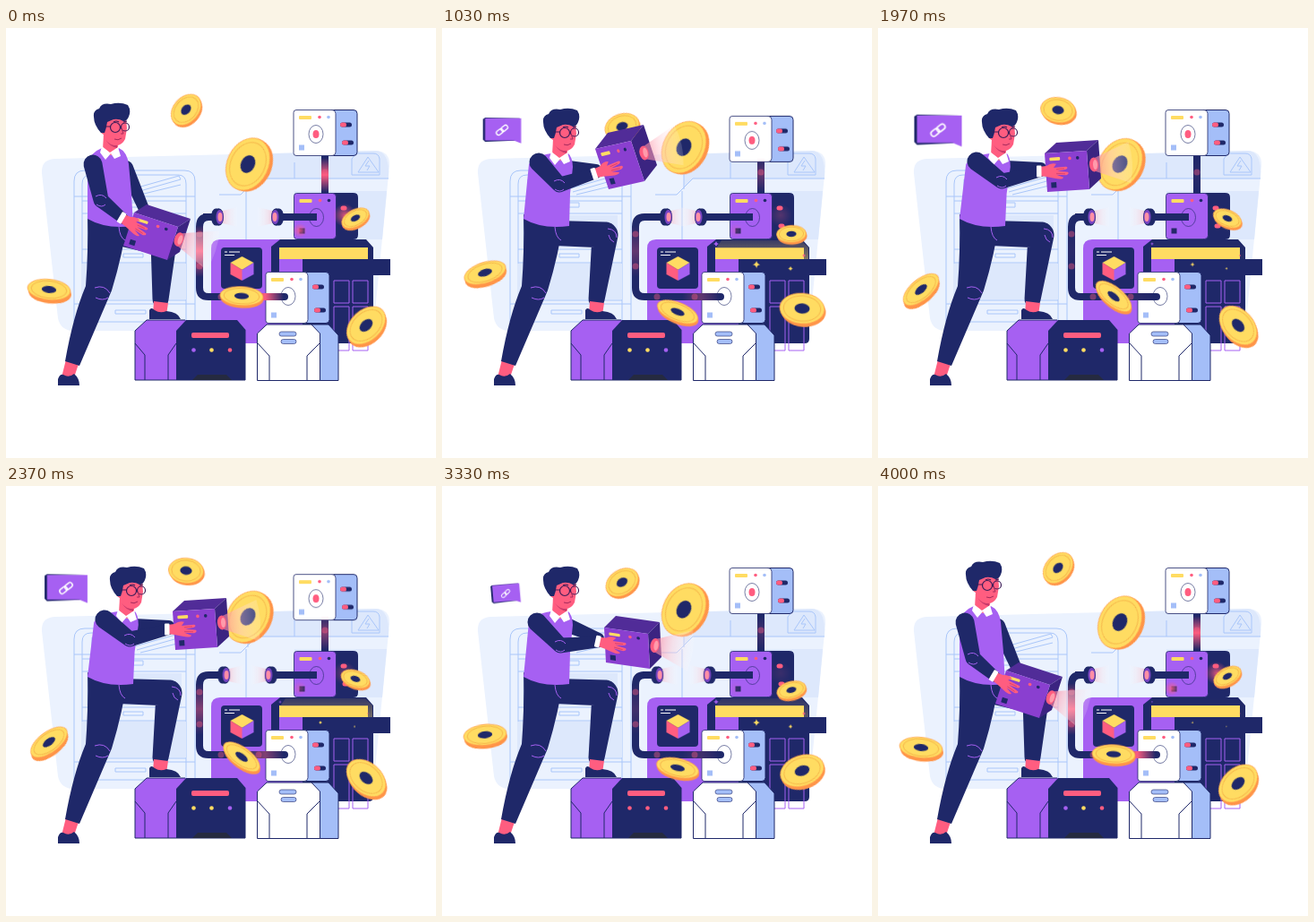
Write an HTML page that moves like this. It is 480 px wide and 480 px high and loops after 4030 ms.

```html
<!DOCTYPE html>
<html lang="en">
<head>
<meta charset="utf-8">
<title>Block factory</title>
<style>
html, body { margin: 0; width: 100%; height: 100%; overflow: hidden; background: #fff; }
svg { display: block; width: 100vw; height: 100vh; }
:root { --sine: cubic-bezier(.37, 0, .63, 1); }
.navy { fill: #1f2869; } .purple { fill: #a660f2; } .pink { fill: #ff5d80; }
.yellow { fill: #ffdc62; } .blue { fill: #a4bef8; } .white { fill: #fff; } .pale { fill: #dde8fc; }
.line { fill: none; stroke: #1f2869; stroke-width: 1; }
.faint { fill: none; stroke: #a9c6fa; stroke-width: 1; }
.seam { fill: none; stroke: #a660f2; stroke-width: 1; }
.pipe { fill: none; stroke: #1f2869; stroke-width: 8; }

.press { animation: press 2015ms ease-in-out infinite; }
@keyframes press { 0%, 4%, 64.5%, 100% { transform: none; } 31%, 37.5% { transform: translateY(14px); } }

.plug { animation: plug 2015ms ease-in-out infinite; }
@keyframes plug { 0%, 4%, 74%, 100% { transform: none; } 31%, 51% { transform: translateX(var(--dx)); } }

.shine { animation: shine 2015ms ease-in-out infinite; }
@keyframes shine { 0%, 8%, 100% { opacity: 0; } 31%, 38% { opacity: 1; } 51% { opacity: .45; } 65%, 92% { opacity: .25; } }

.spark { animation: spark 2015ms ease-in-out infinite; }
@keyframes spark { 0%, 10%, 100% { transform: scale(0); } 31%, 38% { transform: none; } 51% { transform: scale(.6); } 97% { transform: scale(.4); } }

.energy { animation: energy 4030ms ease-in-out infinite; }
@keyframes energy { 0%, 100% { opacity: 1; } 15% { opacity: .25; } 26% { opacity: .3; } 49% { opacity: .05; } 68% { opacity: .8; } 83% { opacity: .15; } }

.bob { animation: bob 1007.5ms var(--sine) infinite alternate; }
@keyframes bob { to { transform: translateY(var(--dy)); } }
.tilt { animation: tilt 2015ms var(--sine) infinite alternate; }
@keyframes tilt { from { transform: rotate(var(--from)); } to { transform: rotate(var(--to)); } }

.card { animation: card 4030ms ease-in-out infinite; }
@keyframes card {
  0%, 5%, 95%, 100% { transform: translate(6px, 6px) rotate(-14deg) scale(0); }
  15.6% { transform: translate(-2px, 4px) rotate(-5deg) scale(.84); }
  25.6%, 68.7% { transform: scale(.82); }
  49% { transform: scale(1.02); }
  82.6% { transform: translate(4px, 6px) rotate(-5deg) scale(.62); }
}
.cube { animation: cube 4030ms ease-in-out infinite; }
@keyframes cube { 0%, 7%, 24%, 100% { transform: none; } 15.6% { transform: rotate(17deg); } }

.lamp { animation: 4030ms step-end infinite; }
.first { animation-name: first; }
.second { animation-name: second; }
.third { animation-name: third; }
@keyframes first { 0%, 93% { fill: #a660f2; } 12% { fill: #ffdc62; } 78% { fill: #ff5d80; } }
@keyframes second { 0%, 90% { fill: #ffdc62; } 62% { fill: #ff5d80; } }
@keyframes third { 0%, 78% { fill: #ff5d80; } 20% { fill: #a660f2; } }
</style>
</head>
<body>
<svg id="stage" viewBox="0 0 480 480">
  <defs>
    <linearGradient id="beamFill"><stop stop-color="#ff7d95" stop-opacity=".65"/><stop offset=".45" stop-color="#ffc9d2" stop-opacity=".45"/><stop offset="1" stop-color="#fff" stop-opacity=".15"/></linearGradient>
    <linearGradient id="pulseV" x2="0" y2="1"><stop stop-color="#ff5d80" stop-opacity="0"/><stop offset=".5" stop-color="#ff5d80"/><stop offset="1" stop-color="#ff5d80" stop-opacity="0"/></linearGradient>
    <linearGradient id="pulseH"><stop stop-color="#ff5d80" stop-opacity="0"/><stop offset=".5" stop-color="#ff5d80"/><stop offset="1" stop-color="#ff5d80" stop-opacity="0"/></linearGradient>
    <linearGradient id="shineFill" x2="0" y2="1"><stop stop-color="#5c5560"/><stop offset="1" stop-color="#ffdc62"/></linearGradient>
    <radialGradient id="glow"><stop stop-color="#ff5d80" stop-opacity=".8"/><stop offset="1" stop-color="#ff5d80" stop-opacity="0"/></radialGradient>
  </defs>

  <!-- room -->
  <path fill="#ebf2fe" d="M54 146L412 137Q429 137 428 154L411 326Q410 338 398 338H76Q61 338 58 324L40 162Q39 147 54 146Z"/>
  <path class="pale" d="M270 141L412 137Q429 137 427 168H280L270 178ZM322 182H425L420 236H322Z"/>
  <path class="faint" d="M270 141V180M238 186H262L280 168H427M268 182V236M322 168V150"/>
  <path class="faint" d="M391 140H410Q416 140 417 146V164H386V146Z"/>
  <path class="faint" d="M404 144L416 161H393ZM405 148L401 154H406L403 159"/>

  <!-- cupboard -->
  <path class="faint" d="M76 328V171Q76 159 88 159H199Q211 159 211 171V328ZM85 328V174Q85 164 95 164H192Q201 164 201 174V328M76 188H211M85 193H201M85 207H201M85 247H201M85 262H201M85 304H201M76 308H211"/>
  <path class="pale" d="M84 263H201V303H84ZM90 209H196V245H90Z"/>
  <path class="faint" d="M131 195H153V200H131ZM131 252H153V256H131ZM122 315H156V319H122ZM96 188V169H102V188M102 172H108V188M112 188L119 169L124 171L117 188M140 180L193 165L195 169L146 183M150 186L195 175"/>

  <!-- display -->
  <path class="purple" d="M229 352V246Q229 236 239 236H331V352Z"/>
  <rect class="navy" x="240" y="245" width="46" height="46" rx="4"/>
  <path stroke="#fff" d="M244 250H247M249 250H261M244 253.500H255"/>
  <g transform="translate(263.500 268)"><g class="cube">
    <path class="yellow" d="M0-13L13-6L0 2L-13-6Z"/><path class="pink" d="M-13-6L0 2V14L-13 7Z"/><path class="purple" d="M13-6L0 2V14L13 7Z"/>
  </g></g>

  <!-- shelf -->
  <path class="navy" d="M296 272V244L306 236H402L410 245V258H429V276H410V347Q410 352 405 352H331V258H305V272Z"/>
  <rect class="yellow" x="305" y="245" width="99" height="13"/>
  <path class="shine" fill="url(#shineFill)" d="M312 237H401L409 245V258H404V246H306Z"/>
  <path class="seam" d="M366 282H383V307H366ZM387 282H404V307H387ZM366 352V311H383V360H370M387 360V311H404V360H387"/>

  <!-- pipes -->
  <path class="pipe" d="M356 138V186"/>
  <g id="crates"></g>
  <path class="pipe" d="M238 211H226Q216 211 216 222V290Q216 300 226 300H311"/>
  <circle class="navy" cx="311" cy="300" r="4"/>
  <path class="pipe" d="M302 211H347"/>
  <g class="pink" opacity=".4"><circle cx="356" cy="161" r="3.500"/><circle cx="216" cy="230" r="3.500"/><circle cx="216" cy="266" r="3.500"/><circle cx="240" cy="300" r="3.500"/><circle cx="282" cy="300" r="3.500"/></g>
  <g class="energy">
    <rect x="352" y="145" width="8" height="38" fill="url(#pulseV)"/>
    <rect x="212" y="220" width="8" height="58" fill="url(#pulseV)"/>
    <rect x="268" y="296" width="42" height="8" fill="url(#pulseH)"/>
    <circle cx="378" cy="209" r="13" fill="url(#glow)"/>
    <circle cx="328" cy="226" r="8" fill="url(#glow)"/>
  </g>
  <g id="plugs"></g>

  <!-- pedestals -->
  <path class="purple" d="M144 393V338L157 326H205V393Z"/>
  <path class="line" d="M144 393V338L157 326H200M144 352L155 365V393M190 352L181 365V393M144 393H267"/>
  <path class="navy" d="M190 393V338L201 326H258L267.500 337V393Z"/>
  <rect class="pink" x="207" y="340" width="42" height="6" rx="2"/>
  <circle class="lamp first" cx="209.500" cy="359.500" r="2.300"/><circle class="lamp second" cx="229.500" cy="359.500" r="2.300"/><circle class="lamp third" cx="250" cy="359.500" r="2.300"/>
  <path fill="#252a40" d="M208 393L214 387H246L252 393Z"/>
  <path class="blue" stroke="#1f2869" d="M338 331H360L371 343V393.500H340Z"/>
  <path class="white" stroke="#1f2869" d="M280.500 393.500V341L291 331H341L350.500 341V393.500Z"/>
  <path class="line" d="M281 352L294 366V393M350 352L336 366V393"/>
  <g class="blue" stroke="#1f2869" stroke-width=".6"><rect x="305" y="339" width="19" height="5" rx="2.500"/><rect x="307" y="347.500" width="17" height="5" rx="2.500"/></g>

  <g id="sparks"></g>
  <g id="coins"></g>

  <g transform="translate(67 114)"><g class="card">
    <path class="navy" d="M-26-15L-23-17L24-16V14L-23 16L-26 13Z"/>
    <path class="purple" d="M-23-16H26V18L16 14H-23Z"/>
    <g transform="rotate(-38)" fill="none" stroke="#fff" stroke-width="1.600"><rect x="-9" y="-3" width="10" height="6" rx="3"/><rect x="-1" y="-3" width="10" height="6" rx="3"/></g>
  </g></g>

  <!-- worker -->
  <path id="backArm" class="navy"/>
  <path id="frontLeg" class="navy"/>
  <path id="knee" class="seam"/>
  <path class="pink" d="M67 370L81 375L76 390H62ZM165 305L181 307L179 320H164Z"/>
  <path class="navy" d="M58 399V392Q60 386 64 387Q70 391 76 386Q82 391 82 399ZM160 325V315Q162 311 166 315Q172 319 179 316Q192 317 195 325Z"/>
  <path class="navy" d="M91 208L135 216Q131 250 118 293L82 377L66 372Q75 321 89 288Q92 250 91 208Z"/>
  <path class="seam" d="M99 290Q110 286 116 296M100 301Q108 305 114 301M126 222Q127 234 133 237"/>
  <path id="torso" class="purple"/>
  <g id="head">
    <path class="pink" d="M109 118L125 122V137L117 142L108 136Z"/>
    <path class="white" d="M107 132L116 139L125 133L128 143L121 146L117 140L111 147L105 139Z"/>
    <path fill="#c93a6b" d="M111 124Q117 131 124 131V134Q115 132 111 124Z"/>
    <path class="pink" d="M107 103Q118 95 134 101L135 112L133 124Q129 132 121 131Q111 129 109 119Q104 117 106 111Z"/>
    <path class="navy" d="M106 117Q98 108 98 99Q97 92 104 90Q107 83 117 85Q127 82 136 86Q140 92 137 99Q135 104 131 104Q126 101 120 102L113 105Q112 112 110 117Z"/>
    <g fill="none" stroke="#3b1d58" stroke-width="1.200"><circle cx="122" cy="111" r="5.500"/><circle cx="133" cy="110.500" r="4.500"/><path d="M117 110L109 110M120 105Q123 103 126 105M131 105L135 104"/></g>
    <path d="M121 124Q125 126 129 123M129 112L131 118L128 118" fill="none" stroke="#a52a5c"/>
  </g>
  <path id="boxTop" fill="#512c98"/>
  <path id="boxSide" fill="#3b2481"/>
  <g id="boxFront">
    <rect width="48" height="42" fill="#8a3fd0"/>
    <rect class="yellow" x="5" y="5" width="12" height="3.500" rx="1"/>
    <circle class="pink" cx="28" cy="7" r="1.800"/><circle class="navy" cx="37" cy="7" r="1.800"/>
    <rect class="navy" x="5" y="32" width="6" height="6"/>
  </g>
  <g id="beam">
    <path fill="url(#beamFill)" d="M0-7L40-23Q46 0 40 23L0 7Z"/>
    <ellipse class="pink" rx="5" ry="8"/><ellipse fill="#ff9bab" cx="1.500" rx="2.500" ry="5.500"/>
  </g>
  <path id="arm" class="navy"/>
  <path id="elbow" class="seam"/>
  <g id="hand">
    <path class="pink" d="M-2-5L6-6Q12-10 17-8L14-4L28-5Q31-4 28-2L18 0L30 1Q32 3 28 4.500L17 4L25 7Q24 10 15 8L6 6L-2 5Z"/>
    <path d="M17-2L26-3M17 2.500L27 3" stroke="#c93a6b" stroke-width=".7"/>
    <rect class="white" x="-5" y="-6.500" width="5.500" height="13" rx="1"/>
  </g>
</svg>
<script>
const $ = id => document.getElementById(id);

const pill = (x, y) => `<rect class="navy" x="${x}" y="${y}" width="13" height="5" rx="2.500"/>
  <rect class="pink" x="${x}" y="${y}" width="7" height="5" rx="2.500"/>`;

function crate(x, y, h, front, side, core) {
  return `<g transform="translate(${x} ${y})">
    <rect class="${side}" x="40" width="31" height="${h}" rx="4" stroke="#1f2869"/>
    <path class="${front}" stroke="#1f2869" stroke-width=".8" d="M3 0H43Q47 0 47 4V${h - 4}Q47 ${h} 43 ${h}H3Q0 ${h} 0 ${h - 3}V3Q0 0 3 0Z"/>
    <rect class="yellow" x="6" y="6.500" width="14" height="4" rx="1"/>
    <circle class="pink" cx="29" cy="8" r="1.800"/>
    <circle class="${side}" cx="39" cy="8" r="1.800"/>
    <ellipse class="line" stroke-opacity=".6" cx="25" cy="27" rx="8" ry="10"/>
    ${core ? '<ellipse class="pink" cx="25" cy="27" rx="3.500" ry="4.500"/>' : ''}
    <rect class="${side}" x="6" y="${h - 12}" width="6" height="6"/>
    ${pill(52, 14)}${pill(54, h - 17)}</g>`;
}
$('crates').innerHTML =
  `<g class="press">${crate(321, 91.500, 51, 'white', 'blue', true)}</g>` +
  crate(321.500, 184.500, 51, 'purple', 'navy') +
  crate(290, 272.500, 57, 'white', 'blue');

const plug = (x, dir) => `<g transform="translate(${x} 211)"><g class="plug" style="--dx:${14 * dir}px">
  <g transform="scale(${dir} 1)">
    <path class="pipe" d="M-16 0H0"/>
    <path fill="url(#beamFill)" opacity=".7" d="M2-6L22-11V11L2 6Z"/>
    <path class="navy" d="M-2-9.500H2V9.500H-2A5 9.500 0 0 1-2-9.500Z"/>
    <ellipse class="navy" cx="2" rx="5" ry="9.500"/><ellipse fill="#7a45c4" cx="2.500" rx="4" ry="8"/>
    <ellipse fill="#ff8fa5" cx="3" rx="2.500" ry="5"/>
  </g></g></g>`;
$('plugs').innerHTML = plug(236, 1) + plug(303, -1);

$('sparks').innerHTML = [[351, 264, 7, 'yellow'], [389, 268.500, 4, 'yellow'], [306, 241, 5, 'purple'], [404, 254, 3, 'pink']]
  .map(([x, y, r, c]) => `<g transform="translate(${x} ${y})"><path class="spark ${c}"
    d="M0 ${-r}Q1-1 ${r} 0Q1 1 0 ${r}Q-1 1 ${-r} 0Q-1-1 0 ${-r}Z"/></g>`).join('');

// x, y, rx, ry, rim x, rim y, first tilt, last tilt, bob
const coins = [
  [201, 91, 19.500, 14, 1.500, 2.500, -48, 9, 19],
  [270, 152, 30.500, 23, 3.500, 1.500, -64, -59, -19],
  [48, 292, 24, 11.500, 1, 4, 6, -40, -19],
  [390, 212, 16.500, 9.500, 1, 2.500, -28, 22, 18],
  [402, 332, 25, 17, 1.500, 3.500, -43, 48, -19],
  [263, 299, 24, 10.500, .5, 3, 3, 39, 18]
];
$('coins').innerHTML = coins.map(([x, y, rx, ry, ox, oy, from, to, dy]) => {
  const oval = (k, attrs) => `<ellipse rx="${rx * k}" ry="${ry * k}" ${attrs}/>`;
  return `<g transform="translate(${x} ${y})" style="--dy:${dy}px;--from:${from}deg;--to:${to}deg">
    <g class="bob" style="animation-delay:${dy > 0 ? -1945 : -30}ms">
      <g transform="translate(${ox} ${oy})"><g class="tilt">${oval(1, 'fill="#ff9448"')}</g></g>
      <g class="tilt">${oval(1, 'class="yellow" stroke="#ff9f4a" stroke-width=".8"')}
        ${oval(.83, 'fill="none" stroke="#f6b64a"')}${oval(.34, 'class="navy"')}</g>
    </g></g>`;
}).join('');

// head, shoulder, elbow, cuff, box corners (left, right, bottom), box depth, back hand, knee
const poses = [
  [0, 0, 97, 152, 106, 192, 131, 213, 143, 206, 192, 222, 131, 243, 14, -9, 154, 202, 176, 240],
  [9, 5, 105, 152, 122, 185, 166, 174, 167, 160, 206, 143, 183, 197, 11, -16, 168, 168, 182, 231],
  [15, 6, 108, 150, 131, 175, 172, 162, 171, 135, 211, 126, 186, 180, 14, -18, 172, 158, 182, 231],
  [18, 6, 110, 149, 138, 171, 182, 160, 186, 140, 233, 137, 189, 183, 13, -12, 182, 156, 182, 231],
  [15, 6, 106, 152, 132, 178, 176, 174, 181, 158, 230, 165, 183, 197, 13, -13, 175, 170, 182, 231]
];
const times = [0, 630, 1030, 1970, 2770, 3330, 4000];
const keys = [0, 1, 2, 3, 3, 4, 0].map(i => poses[i]);

// smooth interpolation without overshoot
function poseAt(t) {
  t = Math.min(t, 3999.9);
  const i = times.findIndex((start, n) => t >= start && t < times[n + 1]);
  const span = times[i + 1] - times[i], u = (t - times[i]) / span;
  return poses[0].map((_, c) => {
    const slope = n => (keys[n + 1][c] - keys[n][c]) / (times[n + 1] - times[n]);
    const tangent = n => {
      if (n === 0 || n === keys.length - 1) return 0;
      const a = slope(n - 1), b = slope(n);
      return a * b > 0 ? 2 * a * b / (a + b) : 0;
    };
    const p = keys[i][c], q = keys[i + 1][c];
    return p + (q - p) * u * u * (3 - 2 * u) +
      span * u * (1 - u) * (tangent(i) * (1 - u) - tangent(i + 1) * u);
  });
}

function taper(x1, y1, r1, x2, y2, r2) {
  const a = Math.atan2(y2 - y1, x2 - x1), nx = -Math.sin(a), ny = Math.cos(a);
  return `M${x1 + nx * r1} ${y1 + ny * r1}L${x2 + nx * r2} ${y2 + ny * r2}` +
    `A${r2} ${r2} 0 0 0 ${x2 - nx * r2} ${y2 - ny * r2}L${x1 - nx * r1} ${y1 - ny * r1}` +
    `A${r1} ${r1} 0 0 0 ${x1 + nx * r1} ${y1 + ny * r1}Z`;
}
const set = (id, d) => $(id).setAttribute('d', d);
const place = (id, value) => $(id).setAttribute('transform', value);
const degrees = (x, y) => Math.atan2(y, x) * 180 / Math.PI;

function draw(t) {
  const [hx, hy, sx, sy, ex, ey, cx, cy, lx, ly, rx, ry, bx, by, dx, dy, px, py, kx, ky] = poseAt(t);
  const ax = rx - lx, ay = ry - ly, vx = bx - lx, vy = by - ly;

  place('head', `translate(${hx} ${hy})`);
  set('torso', `M${107 + hx} ${134 + hy}Q${94 + hx * .6} ${139 + hy * .6} ${91 + hx * .4} 152L91 213Q112 225 142 221` +
    `L${140 + hx * .2} 185L${137 + hx * .6} ${152 + hy * .5}Q${135 + hx * .7} ${138 + hy} ${126 + hx} ${134 + hy}L${117 + hx} ${142 + hy}Z`);
  set('backArm', taper(134 + hx * .5, 156, 8, px, py, 6));
  set('frontLeg', taper(127, 229, 14, kx, ky, 14.500) + taper(kx, ky, 14.500, 172.500, 303, 9));
  set('knee', `M${kx + 3} ${ky - 7}q10 1 10 10m-9 -3q1 6 6 8`);

  set('boxTop', `M${lx} ${ly}l${dx} ${dy}l${ax} ${ay}L${rx} ${ry}Z`);
  set('boxSide', `M${rx} ${ry}l${dx} ${dy}l${vx} ${vy}l${-dx} ${-dy}Z`);
  place('boxFront', `matrix(${ax / 48} ${ay / 48} ${vx / 42} ${vy / 42} ${lx} ${ly})`);
  place('beam', `translate(${rx + (dx + vx) / 2} ${ry + (dy + vy) / 2}) rotate(${degrees(ax, ay)})`);

  set('arm', taper(sx, sy, 10.500, ex, ey, 8.500) + taper(ex, ey, 8.500, cx, cy, 6));
  set('elbow', `M${ex - 6} ${ey - 4}q7 -4 12 2m-11 7q6 4 10 0`);
  place('hand', `translate(${cx} ${cy}) rotate(${degrees(lx + ax * .6 + vx * .5 - cx, ly + ay * .6 + vy * .5 - cy)})`);
}

let start;
function tick(now) {
  start ??= now;
  draw((now - start) % 4030);
  requestAnimationFrame(tick);
}
draw(0);
requestAnimationFrame(tick);
</script>
</body>
</html>
```
